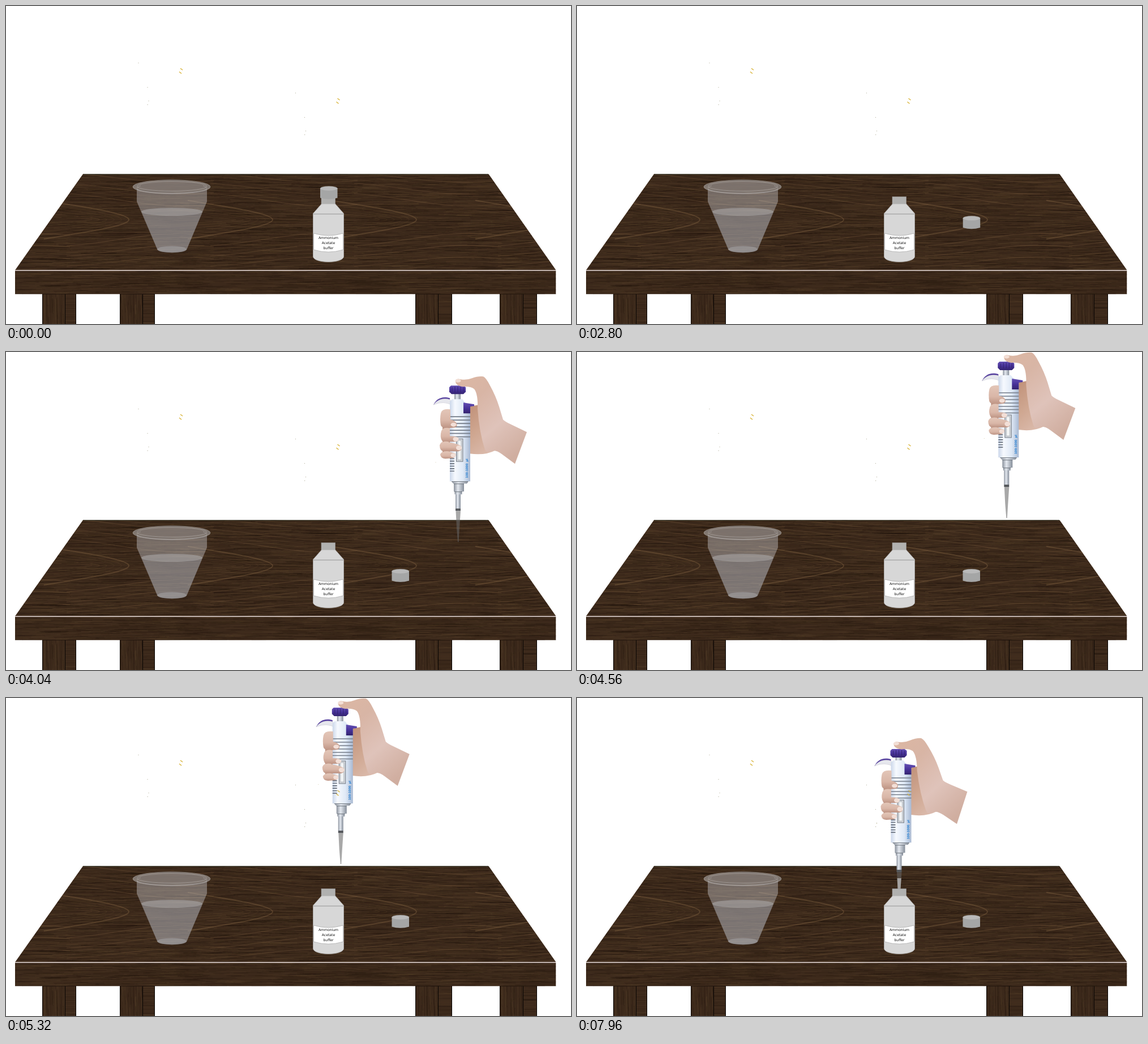
Animation of 998x561 px, one loop 8 s. Source, as an HTML page with a canvas:

```html
<!DOCTYPE html>
<html lang="en">
<head>
<meta charset="utf-8">
<title>Pipetting buffer</title>
<style>
  html, body { margin: 0; width: 100%; height: 100%; overflow: hidden; background: #fff; }
  canvas, svg { position: absolute; left: 0; top: 0; }
  text { font-family: "DejaVu Sans", sans-serif; }
</style>
</head>
<body>
<canvas id="table" width="998" height="561"></canvas>
<svg width="998" height="561" viewBox="0 0 998 561">
  <defs>
    <linearGradient id="skin" x1="0" y1="0" x2=".7" y2="1">
      <stop offset="0" stop-color="#dcb7a3"/><stop offset=".3" stop-color="#d8b5a5"/>
      <stop offset=".65" stop-color="#dfc3ba"/><stop offset="1" stop-color="#d0aea0"/>
    </linearGradient>
    <linearGradient id="palm" x1="0" y1="0" x2=".6" y2="1">
      <stop offset="0" stop-color="#c09078"/><stop offset=".5" stop-color="#cfa791"/><stop offset="1" stop-color="#dcbcae"/>
    </linearGradient>
    <linearGradient id="finger" x1="0" y1="0" x2="0" y2="1">
      <stop offset="0" stop-color="#e3c6b8"/><stop offset=".6" stop-color="#d9b6a7"/><stop offset="1" stop-color="#bd9383"/>
    </linearGradient>
    <linearGradient id="shell">
      <stop offset="0" stop-color="#cbd7ea"/><stop offset=".25" stop-color="#f6f9fe"/>
      <stop offset=".65" stop-color="#dfe9f6"/><stop offset="1" stop-color="#a9b9d2"/>
    </linearGradient>
    <linearGradient id="metal">
      <stop offset="0" stop-color="#8b929d"/><stop offset=".4" stop-color="#e4e9f0"/><stop offset="1" stop-color="#858d99"/>
    </linearGradient>
    <linearGradient id="purple" x1="0" y1="0" x2="0" y2="1">
      <stop offset="0" stop-color="#6450b3"/><stop offset=".5" stop-color="#48339a"/><stop offset="1" stop-color="#33236f"/>
    </linearGradient>
    <clipPath id="liquid"><rect id="level" x="745" width="30" height="60"/></clipPath>
    <path id="tip" d="M754.500 238H763L761 268 759.500 293H758L756 268Z"/>
    <g id="specks">
      <path d="M308 110l4 3M306 116l4 3.200" stroke="#d9b53a" stroke-width="1.400"/>
      <path d="M233.500 100.500h1M249.500 143.500h1M251.500 167.500h1M249.500 174h1.200" stroke="#aaa78f"/>
    </g>
  </defs>

  <!-- beaker -->
  <g>
    <path d="M231 321V345L267.500 430A26 6 0 0 0 319 430L355 345V321A62 9 0 0 1 231 321Z" fill="#c9c9cc" fill-opacity=".42"/>
    <path d="M239.500 363L267.500 430A26 6 0 0 0 319 430L347 363A54 7 0 0 1 239.500 363Z" fill="#8a8b92" fill-opacity=".3"/>
    <ellipse cx="293" cy="363" rx="54" ry="7" fill="#b9b9bb" fill-opacity=".45"/>
    <ellipse cx="293" cy="429" rx="26" ry="5.500" fill="#b5b5b7" fill-opacity=".4"/>
    <ellipse cx="292.500" cy="319" rx="68.500" ry="12.300" fill="#c9c9cb" fill-opacity=".48" stroke="#b3aeac" stroke-opacity=".6" stroke-width=".8"/>
    <ellipse cx="293" cy="318" rx="61.500" ry="8.500" fill="#7b706a" fill-opacity=".55" stroke="#b5b0ad" stroke-opacity=".7" stroke-width=".8"/>
    <path d="M238 317q-4 1-7 4M348 317q4 1 7 4" stroke="#aaa4a0" stroke-opacity=".7" fill="none"/>
  </g>

  <!-- pipette and hand -->
  <g id="pipette">
    <path d="M779 54L800 50 840 90 825 131Q806 141 779 137Z" fill="url(#palm)"/>
    <g id="plunger">
      <rect x="752" y="29" width="11" height="16" fill="url(#metal)"/>
      <path d="M746 17H768L772 20V28L768 32H747L743 28V20Z" fill="url(#purple)"/>
      <path d="M748 20v8M753 19v10M758 19v10M763 19v10M768 20v8" stroke="#2f2069" stroke-width=".8"/>
    </g>
    <path id="hand" fill="url(#skin)" d="M754 8Q756 4 763 6 773 8 783 4 794 0 803 1 808 3 815 17 825 35 831 54L838 77Q842 81 851 85L880 99 859 155 836 138Q824 129 816 133 809 136 806 130 796 100 793 58 794 32 787 23 780 18 767 19 753 17 754 8Z"/>
    <ellipse id="thumbnail" cx="758.500" cy="8.500" rx="5" ry="3" fill="#f3dfd6"/>
    <path d="M715 51C720 41 729 35 744 39V43Q731 40 715 51Z" fill="#56409f"/>
    <path d="M715 51C722 42 731 38.500 744 41.500L749 52Q733 43 715 51Z" fill="#e6e7ed" stroke="#bcbcc8" stroke-width=".5"/>
    <path d="M744 45L748 41H766L770 46 780 55V186H744Z" fill="url(#shell)"/>
    <path d="M768 47L787 50V53L780 54V66H768Z" fill="url(#purple)"/>
    <path d="M744 72h36m-36 6h36m-36 6h36m-36 6h36m-36 6h36m-36 5.500h36m-36 6h36" stroke="#757d89" stroke-width="1.700"/>
    <path d="M744 146h8m-8 4.400h8m-8 4.400h8m-8 4.400h8m-8 4.400h8m-8 4.400h8" stroke="#555d69" stroke-width="1.400"/>
    <rect x="755.500" y="111" width="11.500" height="40" fill="#cfd3d8" stroke="#737a84"/>
    <rect x="758" y="114" width="6" height="34" fill="#f2f4f5" stroke="#a6abb2" stroke-width=".7"/>
    <text transform="translate(776.300 180) rotate(-90)" font-size="6" font-weight="bold" fill="#1c7ad0" xml:space="preserve" style="font-family:'Liberation Sans',sans-serif">100-1000  µl</text>
    <path d="M731 65H744V143H731Z" fill="#bd9383"/>
    <g fill="url(#finger)">
      <path d="M745 59Q730 57 728 66 726 76 728 87 730 93 741 92L753 91Q759 88 755 82 752 78 745 77Z"/>
      <path d="M744 92Q732 90 729 97 726 107 730 114 734 118 745 116L756 116Q761 112 757 108 751 106 744 106Z"/>
      <path d="M742 116Q728 114 726 122 726 132 733 133H759Q767 131 764 124 760 120 742 117Z"/>
      <path d="M742 133Q730 132 727 138 727 145 736 146L749 145Q756 142 754 137Z"/>
    </g>
    <g fill="#f2dfd7">
      <ellipse cx="750.500" cy="86" rx="5" ry="3.500"/><ellipse cx="754.500" cy="111.500" rx="5" ry="4"/>
      <ellipse cx="760" cy="127" rx="5" ry="4.200"/><ellipse cx="750" cy="140" rx="4.500" ry="3.500"/>
    </g>
    <g fill="url(#metal)">
      <path d="M747 186H777L774 190H750Z"/><rect x="751" y="190" width="18" height="14"/>
      <rect x="752.500" y="204" width="13" height="5"/><rect x="754" y="209" width="9" height="25"/>
    </g>
    <path d="M747 186.500h29M751 190.500h18M752 204.500h14" stroke="#70777f"/>
    <rect x="754" y="234" width="9" height="4" fill="#55585c"/>
    <use href="#tip" fill="#666" fill-opacity=".57"/>
    <use href="#tip" fill="#cfcfd0" fill-opacity=".65" clip-path="url(#liquid)"/>
    <path d="M718.500 152.500h1" stroke="#d9d2b5"/>
  </g>

  <!-- bottle -->
  <rect x="557" y="336.500" width="24.500" height="13" fill="#b1b1b0" stroke="#999" stroke-width=".6"/>
  <path d="M557.500 349H581.500L596.500 366V442A27 9.500 0 0 1 542.500 442V366Z" fill="#d7d7d7" stroke="#b0b0b0" stroke-width=".8"/>
  <path d="M543 367H596" stroke="#aaa" stroke-width="1.300"/>
  <path d="M543.500 401Q569.500 409 595.500 401V430Q569.500 438 543.500 430Z" fill="#fff" stroke="#aaa" stroke-width=".8"/>
  <g font-size="6.100" text-anchor="middle" fill="#111">
    <text x="569.500" y="411">Ammonium</text><text x="569.500" y="420">Acetate</text><text x="569.500" y="428.800">buffer</text>
  </g>
  <g id="cap">
    <path d="M0 4V20.500Q15 25 30.500 20.500V4Z" fill="#a5a6a6"/>
    <ellipse cx="15.250" cy="4" rx="15.250" ry="4" fill="#b9b9b9" stroke="#a0a0a0" stroke-width=".5"/>
  </g>

  <use href="#specks"/>
  <use href="#specks" x="277.500" y="53"/>
</svg>
<script>
const $ = id => document.getElementById(id);
const ctx = $('table').getContext('2d');
let seed = 7;
const random = () => (seed = seed * 16807 % 2147483647) / 2147483647;

function line(x1, y1, x2, y2, color, width = 1) {
  ctx.strokeStyle = color;
  ctx.lineWidth = width;
  ctx.beginPath();
  ctx.moveTo(x1, y1);
  ctx.lineTo(x2, y2);
  ctx.stroke();
}

function curve(points, alpha, width) {
  ctx.strokeStyle = `rgba(128,98,64,${alpha})`;
  ctx.lineWidth = width;
  ctx.stroke(new Path2D(`M${points[0]}C${points.slice(1).join(' ')}`));
}

// One repeat of the figured grain: a pointed arch with long sloping strands above and below.
function figure(tipX) {
  const y = 377;
  for (let i = 0; i < 6; i++) {
    const x = tipX - i * 13, spread = 34 - i * 5;
    for (const side of [-1, 1])
      curve([[x - 150, y + side * spread], [x - 90, y + side * spread * .7], [x, y + side * spread * .35], [x, y]],
        i ? .16 : .42, i ? 1 : 2);
  }
  for (let i = 0; i < 9; i++) {
    const alpha = i % 3 ? .14 : .34, drop = 24 - i;
    for (const side of [-1, 1]) {
      const near = y + side * (22 + i * 7);
      curve([[tipX - 110, near + side * drop], [tipX - 20, near + side * drop * .8],
        [tipX + 40, near - side * 6], [tipX + 150, near + side * 5]], alpha, 1.2);
    }
  }
}

// Fine random grain inside a polygon, optionally figured and outlined.
function wood(points, { vertical = false, figured = false, outline = false } = {}) {
  const xs = points.map(p => p[0]), ys = points.map(p => p[1]);
  const left = Math.min(...xs), top = Math.min(...ys);
  const width = Math.max(...xs) - left, height = Math.max(...ys) - top;
  const shape = new Path2D('M' + points.join('L') + 'Z');
  ctx.save();
  ctx.clip(shape);
  ctx.fillStyle = '#3c291b';
  ctx.fillRect(left, top, width, height);
  for (let i = 0; i < width * height / 32; i++) {
    const x = left + random() * width, y = top + random() * height;
    const length = 15 + random() * 70, alpha = .06 + random() * .2;
    const color = random() < .5 ? `rgba(22,13,7,${alpha})` : `rgba(98,76,50,${alpha})`;
    if (vertical) line(x, y - length / 2, x + 1, y + length / 2, color);
    else line(x - length / 2, y, x + length / 2, y + random() * 2 - 1, color);
  }
  if (figured) for (let tile = -1; tile < 5; tile++) figure(217 + tile * 254);
  ctx.restore();
  if (outline) {
    ctx.strokeStyle = '#080503';
    ctx.lineWidth = 1;
    ctx.stroke(shape);
  }
}

const box = (x1, y1, x2, y2) => [[x1, y1], [x2, y1], [x2, y2], [x1, y2]];
for (const [x1, x2, x3] of [[64, 104, 123], [201, 241, 262], [723, 763, 787], [872, 913, 937]]) {
  wood(box(x2 + .5, 508, x3 + .5, 562), { outline: true });
  wood(box(x1 + .5, 508, x2 + .5, 562), { vertical: true, outline: true });
}
wood([[136, 296.5], [852.5, 296.5], [971.5, 466], [16, 466]], { figured: true });
wood(box(16, 467, 971.500, 508.5));
line(136, 297, 852, 297, '#1e2012');
line(16, 466.5, 971, 466.5, '#f1e5e3', 1.4);

// Keys are [time, x, y].
const capPath = [[0, 555, 318], [840, 578.5, 266.5], [1640, 661.5, 287.5], [2520, 680.5, 352.5], [3000, 681.5, 383]];
const pipettePath = [[3000, 40, 171], [4380, 40, 0], [5421, -189.5, 0], [5890, -189.5, 69]];

function follow(keys, time, smooth) {
  const last = keys.length - 1;
  if (time >= keys[last][0]) return keys[last].slice(1);
  const i = Math.max(0, keys.findIndex(key => key[0] > time) - 1);
  const a = keys[i], b = keys[i + 1], span = b[0] - a[0], u = (time - a[0]) / span;
  const slope = (n, axis) => {
    const before = keys[Math.max(0, n - 1)], after = keys[Math.min(last, n + 1)];
    return (after[axis] - before[axis]) / (after[0] - before[0]) * span;
  };
  return [1, 2].map(axis => {
    const delta = b[axis] - a[axis];
    if (!smooth) return a[axis] + delta * u;
    return a[axis] + delta * u * u * (3 - 2 * u)
      + slope(i, axis) * u * (1 - u) ** 2 - slope(i + 1, axis) * u * u * (1 - u);
  });
}

const progress = (time, start, end) => Math.min(1, Math.max(0, (time - start) / (end - start)));
const start = performance.now();

function draw() {
  const time = Math.floor((performance.now() - start) % 8000 / 40) * 40;
  const press = progress(time, 5900, 7960);
  $('cap').setAttribute('transform', `translate(${follow(capPath, time, true)})`);
  $('pipette').setAttribute('transform', `translate(${follow(pipettePath, time)})`);
  $('pipette').style.display = time < 3000 ? 'none' : '';
  $('plunger').setAttribute('transform', `translate(0 ${4 * press})`);
  for (const id of ['hand', 'thumbnail'])
    $(id).setAttribute('transform', `rotate(${-2.6 * press} 820 121)`);
  $('level').setAttribute('y', 294 - 45 * progress(time, 6400, 7960));
  requestAnimationFrame(draw);
}
draw();
</script>
</body>
</html>
```
